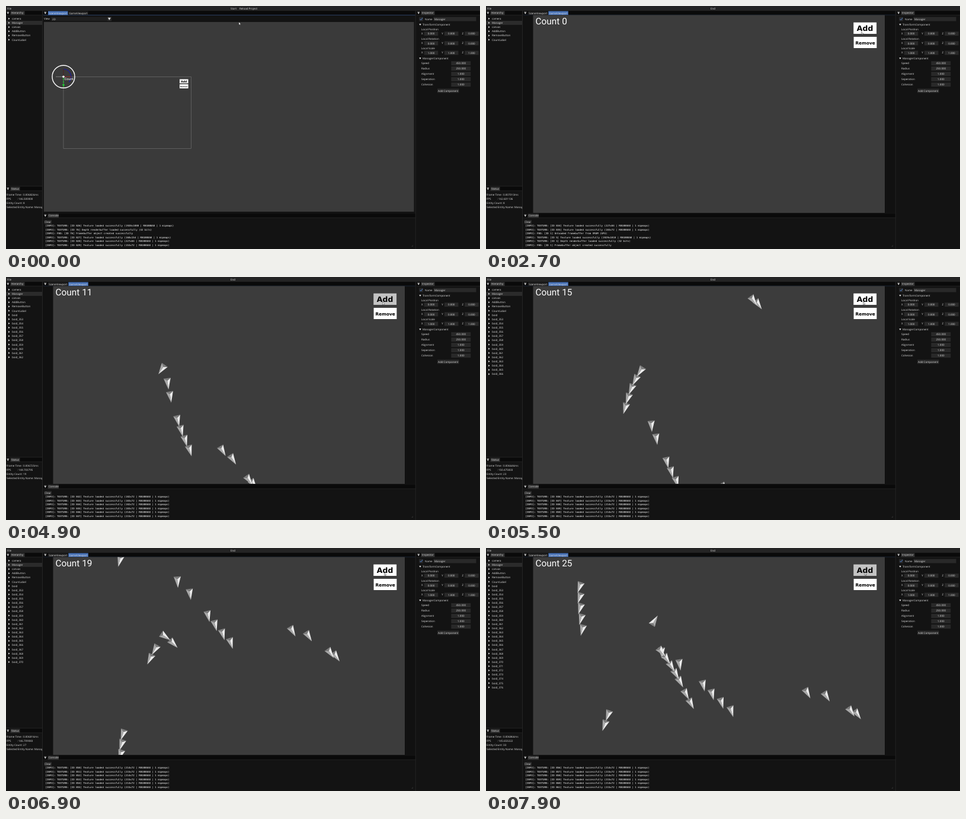
Recreate the animation shown at these times as an HTML page. Size 800x410 px, loop 8000 ms.

```html
<!DOCTYPE html>
<html lang="en">
<head>
<meta charset="utf-8">
<title>Boids in an editor</title>
<style>
html, body { margin: 0; width: 100%; height: 100%; overflow: hidden; background: #131313; }
svg { display: block; width: 800px; height: 410px; }
text { font: 4.5px "Open Sans", "Noto Sans", sans-serif; fill: #dedede; text-rendering: geometricPrecision; white-space: pre; }
.mono { font: 4.1px "DejaVu Sans Mono", monospace; fill: #fff; }
.count { font: 15.4px Roboto, sans-serif; fill: #fff; }
.btn { font-family: "DejaVu Sans", sans-serif; font-weight: bold; fill: #000; }
.mid { text-anchor: middle; }
</style>
</head>
<body>
<svg id="stage" viewBox="0 0 800 410"></svg>
<script>
const NS = 'http://www.w3.org/2000/svg';
const PANEL = '#131313', FIELD = '#292929', TAB = '#333', BLUE = '#4772b8';
let parent = document.getElementById('stage');

function add(tag, attrs, to = parent) {
  const el = document.createElementNS(NS, tag);
  for (const k in attrs) el.setAttribute(k, attrs[k]);
  to.appendChild(el);
  return el;
}
const box = (x, y, width, height, fill, more) => add('rect', { x, y, width, height, fill, ...more });
const path = (d, fill, more) => add('path', { d, fill, ...more });
const line = (d, stroke, width, more) => path(d, 'none', { stroke, 'stroke-width': width, ...more });
// y is the middle of the line of text
function label(x, y, str, cls = '', size) {
  const el = add('text', { x, y: y + 1.6, class: cls });
  if (size) el.style.fontSize = size + 'px';
  el.textContent = str;
  return el;
}
function group(fill, attrs = {}) {
  const outer = parent, g = add('g', attrs);
  parent = g;
  fill();
  parent = outer;
  return g;
}
const show = (el, on) => el.setAttribute('visibility', on ? 'inherit' : 'hidden');
const right = (x, y) => path(`M${x - 1} ${y - 1.6}L${x + 1.6} ${y}L${x - 1} ${y + 1.6}Z`, '#ddd');
const down = (x, y, s = 1.7) => path(`M${x - s} ${y - s * .7}H${x + s}L${x} ${y + s}Z`, '#ddd');

function titleBar(x, y, w, name, tabW, tone = TAB) {
  box(x, y, w, 7, '#0a0a0a');
  box(x, y + 6.6, w, .5, tone);
  box(x + 1.3, y + 1.4, 4, .7, '#ccc');
  down(x + 3.3, y + 3.7);
  if (!name) return;
  box(x + 7.5, y + .3, tabW, 6.5, TAB);
  label(x + 9, y + 3.5, name);
}
function field(x, y, w, value) {
  box(x, y - 3.5, w, 7, FIELD);
  label(x + w / 2, y + .1, value, 'mid');
}

// Clicks come in runs; each run of boids leaves with one heading and bends to another.
const LOOP = 8000, START = 700, STEP = 100, SPEED = .12, BEND = 300;
const SPAWN = [268, 149], TOP = 1, PERIOD = 362;
const runs = [
  { at: 2810, gap: 85, n: 2, from: 46, to: 54.5, fan: .6 },
  { at: 3260, gap: 180, n: 2, from: 38, to: 57.8, fan: 2.8 },
  { at: 3650, gap: 150, n: 4, from: 75, to: 73.2, fan: 1.5 },
  { at: 4450, gap: 190, n: 2, from: 78, to: 82.2, fan: 4.4 },
  { at: 4830, gap: 140, n: 5, from: 130, to: 104.2, fan: 1.2 },
  { at: 6515, gap: 150, n: 2, from: 134, to: 109, fan: 0 },
  { at: 6740, gap: 150, n: 2, from: 34, to: 63, fan: 0 },
  { at: 7075, gap: 125, n: 5, from: 30, to: 64, fan: 0 },
  { at: 7640, gap: 0, n: 1, from: -58, to: -58, fan: 0 },
];
const flock = runs.flatMap(r => Array.from({ length: r.n }, (_, i) =>
  ({ born: r.at + i * r.gap, from: r.from, to: r.to + i * r.fan })));
const presses = [...flock.map(b => b.born), LOOP];

const headingOf = (b, age) => b.to + (b.from - b.to) * Math.exp(-age / BEND);
function fly(b, age) {
  let [x, y] = SPAWN;
  for (let s = 0; s < age; s += 10) {
    const a = headingOf(b, s) * Math.PI / 180, d = Math.min(10, age - s) * SPEED;
    x += Math.cos(a) * d;
    y += Math.sin(a) * d;
  }
  if (y > TOP) y = TOP + (y - TOP) % PERIOD;
  return [x, y];
}

// [time, x, y], eased between
const pointer = [[0, 393, 27], [600, 383, 4], [1000, 383, 4], [2500, 633.5, 43], [LOOP, 639, 41]];
function pointerAt(t) {
  const i = pointer.findIndex(p => p[0] > t);
  const [a, b] = [pointer[i - 1], pointer[i]];
  const f = (t - a[0]) / (b[0] - a[0]), e = f * f * (3 - 2 * f);
  return [a[1] + (b[1] - a[1]) * e, a[2] + (b[2] - a[2]) * e];
}

// Log
const tex = (id, size) => `[INFO]: TEXTURE: [ID ${id}] Texture loaded successfully (${size} | R8G8B8A8 | 1 mipmaps)`;
const depth = id => `[INFO]: TEXTURE: [ID ${id}] Depth renderbuffer loaded successfully (32 bits)`;
const fbo = (id, what) => `[INFO]: FBO: [ID ${id}] ${what}`;
const made = 'Framebuffer object created successfully';
const editLog = [tex(826, '1920x1080'), depth(76), fbo(76, made),
  tex(827, '168x154'), tex(828, '227x84'), tex(829, '153x72')];
const playLog = [tex(834, '227x84'), tex(835, '183x72'), fbo(1, 'Unloaded framebuffer from VRAM (GPU)'),
  tex(5, '1929x1010'), depth(1), fbo(1, made)];
// The label gets wider with its second digit
const countLog = flock.map((_, i) => tex(837 + i, (i < 9 ? 183 : 215) - i % 2 + 'x72'));
const fpsAt = t => 146.5 + 4 * Math.sin(t * 1.37);

// Left column
box(0, 0, 800, 410, PANEL);
titleBar(0, 8.3, 61, 'Hierarchy', 24);
box(0, 25, 61, 6.8, '#2b2b2b');
const entities = ['camera', 'Manager', 'canvas', 'AddButton', 'RemoveButton', 'CountLabel',
  ...flock.map((_, i) => i ? 'boid_' + (352 + i) : 'boid')];
const rows = entities.map((name, i) => group(() => {
  const y = 21.3 + i * 7.125;
  right(5, y);
  label(10, y, name);
}));
box(0, 303.5, 61, .8, '#242424');
titleBar(0, 305, 61, 'Status', 16);
label(1, 318.2, 'Frame Time :');
const frameTime = label(29, 318.2, '');
label(1, 325.2, 'FPS');
label(19, 325.2, ':');
const fpsText = label(21, 325.2, '');
const entityText = label(1, 332.5, '');
label(1, 339.5, 'Selected Entity Name: Manager');

// Middle column
box(61, 8, 631, 402, PANEL);
titleBar(63, 8.3, 628, '', 0, BLUE);
const tabs = [[71, 'SceneViewport'], [105.3, 'GameViewport']].map(([x, name]) => {
  const back = box(x, 8.6, 33.5, 6.5, '#1c1c1c');
  label(x + 16.75, 11.9, name, 'mid');
  return back;
});

const sceneView = group(() => {
  label(64, 21.7, 'View');
  box(76, 18.3, 102, 7, '#1f1f1f');
  box(171, 18.3, 7, 7, FIELD);
  label(78, 21.9, '2D');
  down(174.4, 21.5, 2.4);
  box(64, 27, 624.5, 320, '#3a3a3a');
  box(97, 119.5, 215.3, 121, 'none', { stroke: '#777', 'stroke-width': .6 });
  add('circle', { cx: 97, cy: 119.3, r: 19, fill: 'none', stroke: '#fff', 'stroke-width': 1.4 });
  line('M97 106.5A12.8 12.8 0 0 1 106 128.4', '#1c1c9a', 1.2);
  line('M97 106.5V119', '#551c1c', .8);
  line('M97 119.3H110', '#8c2020', 1);
  line('M84 119.3H96', '#aaa', .6);
  line('M97 121V136', '#20c030', 1.2, { 'stroke-dasharray': '4 1' });
  path('M94.8 132H99.2L97 137Z', '#20c030');
  label(98.5, 123, 'Count', 'count', 5.8);
  add('circle', { cx: 97, cy: 119.3, r: 1.8, fill: '#fff' });
  box(293, 123.5, 14.6, 7, '#fff');
  box(293, 132, 14.6, 7, '#fff');
  label(300.3, 127.1, 'Add', 'btn mid', 4.6);
  label(300.3, 135, 'Remove', 'btn mid', 2.7);
});

const view = { x: 79.5, y: 15.3, width: 593.5, height: 333.7 };
add('rect', view, add('clipPath', { id: 'view' }));
let addButton, countText, boids;
const gameView = group(() => {
  box(62, 15.3, 629, 333.7, '#111');
  add('rect', { ...view, fill: '#3c3c3c' });
  group(() => {
    boids = flock.map(() => group(() => {
      path('M10 0L-9 6L-5 0Z', '#a8a8a8');
      path('M10 0L-9 -6L-5 0Z', '#ececec');
      path('M-9 6L-5 0L-9 -6Z', '#7c7c7c');
    }));
  }, { 'clip-path': 'url(#view)' });
  addButton = box(620.3, 27.7, 38.8, 19.3, '#fff');
  box(620.6, 52, 38.8, 19, '#fff');
  label(639.6, 40.2, 'Add', 'btn mid', 12.5);
  label(640.2, 63, 'Remove', 'btn mid', 7.4);
  countText = label(83.5, 29, '', 'count');
});

titleBar(63, 350.3, 628, 'Console', 18.5);
box(64.5, 361, 12.5, 6.8, FIELD);
label(70.7, 364.5, 'Clear', 'mid');
const lines = editLog.map((_, i) => label(66.4, 370.8 + i * 6.47, '', 'mono'));
path('M687 403V406H684Z', '#2a2a2a');

// Right column
box(690.8, 8, 1, 402, '#242424');
box(61, 8, 1, 402, '#242424');
titleBar(693, 8.3, 107, 'Inspector', 23);
box(697.2, 18.6, 7, 6.8, FIELD);
line('M698.7 22L700.3 23.8L703 20', '#4f86dd', .9);
label(707, 22, 'Name');
box(721.5, 18.5, 72, 7, FIELD);
label(723, 22, 'Manager');
down(699, 31.3);
label(703, 31.5, 'TransformComponent');
['Position', 'Rotation', 'Scale'].forEach((name, i) => {
  const y = 46.7 + i * 16.15;
  label(701, y - 7.7, 'Local ' + name);
  ['X', 'Y', 'Z'].forEach((axis, j) => {
    label(701 + j * 34.2, y - .2, axis);
    field(705.7 + j * 34.2, y, 23.6, name === 'Scale' ? '1.000' : '0.000');
  });
});
down(699, 88.3);
label(703, 88.5, 'ManagerComponent');
const settings = { Speed: 450, Radius: 250, Alignment: 1, Seperation: 1, Cohesion: 1 };
Object.entries(settings).forEach(([name, value], i) => {
  const y = 96.6 + i * 9;
  label(701, y - .2, name);
  field(751.3, y, 33, value.toFixed(3));
});
field(728, 143, 36.5, 'Add Component');

// Menu bar
box(0, 0, 800, 8, '#242424');
label(2, 4, 'File');
const editMenu = group(() => {
  label(379, 4, 'Start');
  label(394, 4, 'Reload Project');
});
const playMenu = group(() => label(379, 4, 'End'));
const cursor = path('M0 0V5L1.2 3.9L2 5.6L2.7 5.3L2 3.7H3.5Z', '#fff', { stroke: '#111', 'stroke-width': .4 });

function draw(t) {
  const playing = t >= START;
  const count = flock.filter(b => b.born < t).length;
  const born = flock.filter(b => b.born <= t).length;

  for (const el of [sceneView, editMenu]) show(el, !playing);
  for (const el of [gameView, playMenu]) show(el, playing);
  tabs.forEach((tab, i) => tab.setAttribute('fill', playing === (i === 1) ? BLUE : '#1c1c1c'));

  rows.forEach((row, i) => show(row, i < 6 + born));
  const log = playing ? [...playLog, ...countLog.slice(0, count)].slice(-6) : editLog;
  lines.forEach((el, i) => { el.textContent = log[i]; });
  const fps = fpsAt(t);
  frameTime.textContent = (1 / fps).toFixed(6) + 'ms';
  fpsText.textContent = fps.toFixed(6);
  entityText.textContent = 'Entity Count: ' + (8 + born);
  countText.textContent = 'Count ' + count;
  addButton.setAttribute('fill', presses.some(p => p >= t && p - t <= STEP) ? '#c3c3c3' : '#fff');

  flock.forEach((b, i) => {
    const age = t - b.born;
    show(boids[i], age > 0);
    if (age > 0) boids[i].setAttribute('transform', `translate(${fly(b, age)}) rotate(${headingOf(b, age)})`);
  });
  cursor.setAttribute('transform', `translate(${pointerAt(t)})`);
}

const began = performance.now();
function tick() {
  const t = (performance.now() - began) % LOOP;
  draw(Math.floor(t / STEP) * STEP);
  requestAnimationFrame(tick);
}
tick();
</script>
</body>
</html>
```
